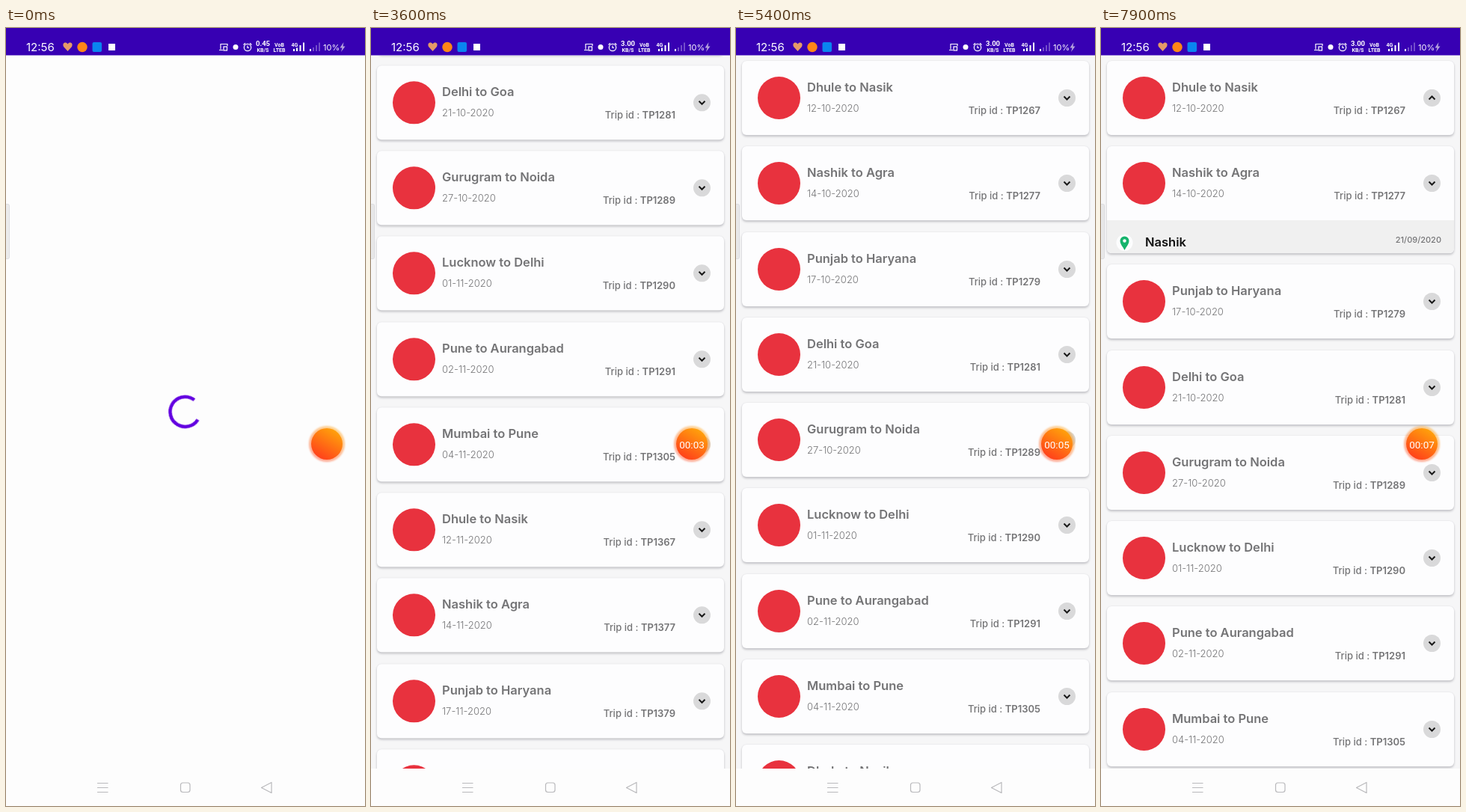
Recreate the animation shown at these times as an HTML page. Size 480 by 1040 pixels, loop 8000 ms.

```html
<!DOCTYPE html>
<html lang="en">
<head>
<meta charset="utf-8">
<title>Trip list</title>
<style>
  html, body { margin: 0; width: 100%; height: 100%; overflow: hidden; background: #fdfdfd; }
  #stage { position: absolute; left: 0; top: 0; width: 480px; height: 1040px; overflow: hidden;
    font-family: Inter, "Open Sans", sans-serif; color: #747476; }
  #stage svg { position: absolute; left: 0; top: 0; }
  .t { position: absolute; line-height: 20px; white-space: pre; }

  /* loader */
  #loader { animation: loader 8s step-end infinite; }
  #arc { transform-origin: 239.5px 513px; animation: spin 8s linear infinite; }
  @keyframes loader { 0% { visibility: visible } 6.25%, 100% { visibility: hidden } }
  @keyframes spin {
    0% { transform: rotate(31deg); stroke-dasharray: 277 360; stroke-dashoffset: 0; }
    6.25%, 100% { transform: rotate(140deg); stroke-dasharray: 25 360; stroke-dashoffset: -252; }
  }

  /* trip list */
  #view { position: absolute; left: 0; top: 37px; width: 480px; height: 953px; overflow: hidden;
    background: #f6f6f7; animation: show 8s step-end infinite; }
  #list { padding-top: 7px; animation: scroll 8s infinite; }
  @keyframes show { 0% { visibility: hidden } 6.25%, 100% { visibility: visible } }
  @keyframes scroll {
    0%, 41.25% { transform: none; animation-timing-function: cubic-bezier(.3, .1, .3, 1); }
    53.5%, 56.25% { transform: translateY(-744.5px); animation-timing-function: cubic-bezier(.3, .1, .3, 1); }
    66.25%, 100% { transform: none; }
  }
  .card { position: relative; margin: 0 8px 15.25px; border-radius: 6px; overflow: hidden;
    background: #fdfdfe; box-shadow: 0 0 2px #dcdce0, 0 2px 3px rgba(70, 70, 85, .32); }
  .head { position: relative; height: 99px; }
  .logo { position: absolute; left: 20.5px; top: 21px; width: 57px; height: 57px; border-radius: 50%; background: #e8323e; }
  .route { left: 87px; top: 25px; font-size: 16.5px; font-weight: 600; }
  .date { left: 87px; top: 53px; font-size: 13px; font-weight: 300; }
  .trip { right: 65px; top: 56px; font-size: 13px; font-weight: 500; }
  .trip b { font-weight: 600; }
  .more { position: absolute; left: 423px; top: 38px; width: 23px; height: 23px; border-radius: 50%; background: #d9d9da; }
  #stage .more svg { width: 23px; height: 23px; }
  .card:first-child .more { animation: flip 8s infinite; }
  @keyframes flip { 0%, 83% { transform: none } 86.5%, 100% { transform: rotate(180deg) } }

  /* expanding details */
  .panel { position: relative; height: 0; overflow: hidden; background: #f0f0f0; }
  .card:nth-child(1) .panel { animation: open1 8s infinite; }
  .card:nth-child(2) .panel { animation: open2 8s infinite; }
  @keyframes open1 {
    0%, 69.5% { height: 0; animation-timing-function: cubic-bezier(.4, 0, .2, 1); }
    74%, 83% { height: 258.5px; animation-timing-function: cubic-bezier(.4, 0, .2, 1); }
    87.75%, 100% { height: 0; }
  }
  @keyframes open2 {
    0%, 97.25% { height: 0; animation-timing-function: cubic-bezier(.333, 0, .667, .333); }
    100% { height: 145px; }
  }
  .stop { position: absolute; left: 0; width: 464px; height: 114px; }
  .city { left: 51px; top: 18.5px; font-size: 16.5px; font-weight: 600; color: #111; }
  .day { right: 17px; top: 15.5px; font-size: 11px; font-weight: 500; }
  .pick { left: 52px; top: 63px; font-size: 13px; font-weight: 600; color: #111; }
  .addr { left: 123px; top: 63px; font-size: 11.5px; font-weight: 300; color: #858587; }
  .map { right: 17px; top: 63px; font-size: 8.5px; font-weight: 500; color: #6200d8; }

  /* counters */
  #clock { position: absolute; left: 404px; top: 547px; width: 50px; height: 20px; overflow: hidden;
    text-align: center; color: #fff; font: 13.5px/20px Roboto, sans-serif; animation: clock 8s step-end infinite; }
  #clock div { animation: tick 8s steps(8) -7.9s infinite; }
  @keyframes clock { 0% { visibility: hidden } 1.25%, 100% { visibility: visible } }
  @keyframes tick { to { transform: translateY(-160px) } }
  #speed { position: absolute; left: 328px; top: 16px; width: 31px; height: 10px; overflow: hidden;
    text-align: center; color: #fff; font: 700 9.5px/10px Roboto, sans-serif; }
  #speed div { animation: speed 8s step-end infinite; }
  @keyframes speed {
    0% { transform: none }
    22.5% { transform: translateY(-10px) }
    41.25%, 100% { transform: translateY(-20px) }
  }
</style>
</head>
<body>
<div id="stage">
  <svg id="loader" width="480" height="1040">
    <rect width="480" height="1040" fill="#fdfdfd"/>
    <circle id="arc" cx="239.5" cy="513" r="20" pathLength="360" fill="none" stroke="#6200e0" stroke-width="4.5"/>
  </svg>

  <div id="view"><div id="list"></div></div>

  <svg width="480" height="1040">
    <defs>
      <linearGradient id="fire" x1=".2" y1="1" x2=".8" y2="0">
        <stop offset="0" stop-color="#ff3a1c"/><stop offset="1" stop-color="#ffa80a"/>
      </linearGradient>
      <filter id="soft" x="-20%" y="-20%" width="140%" height="140%"><feGaussianBlur stdDeviation="1"/></filter>
    </defs>
    <rect x="-4" y="235.5" width="8.5" height="73" rx="2" fill="#dcdcdf" fill-opacity=".55" stroke="#cfcfd4" stroke-opacity=".6"/>
    <circle cx="429" cy="556" r="24" fill="url(#fire)" opacity=".45" filter="url(#soft)"/>
    <circle cx="429" cy="556" r="21" fill="url(#fire)"/>

    <!-- status bar -->
    <rect width="480" height="36.5" fill="#3700b3"/>
    <g fill="#fff" font-family="Inter, sans-serif">
      <text x="27" y="31" font-size="15">12:56</text>
      <path d="M82.5 31 L77 25 C74.5 20 80 17.5 82.5 21.5 C85 17.5 90.5 20 88 25 Z" fill="#e59a68"/>
      <circle cx="102" cy="25.5" r="6.7" fill="#ff8618"/>
      <rect x="115.5" y="19" width="12.5" height="13" rx="2" fill="#0a84f0"/>
      <rect x="137" y="21" width="9" height="9"/>
      <g fill="none" stroke="#fff" stroke-width="1.2">
        <path d="M287 28.5 V21.5 H296 V24 M285 29.5 H290"/>
        <rect x="291" y="25" width="4.5" height="5"/>
        <circle cx="323" cy="26" r="4.7"/>
        <path d="M323 23.5 V26.5 H325 M317.5 22.5 L320 20.2 M328.5 22.5 L326 20.2"/>
      </g>
      <circle cx="307" cy="25.5" r="3.5"/>
      <g font-weight="700" font-size="7" font-family="Roboto, sans-serif">
        <text x="343.5" y="32" text-anchor="middle">KB/S</text>
        <text x="365.5" y="24.5" text-anchor="middle">VoB</text>
        <text x="365.5" y="31.5" text-anchor="middle">LTEB</text>
        <text x="381.5" y="25">4G</text>
      </g>
      <path d="M384 28h2v3h-2z M388 26.5h2v4.5h-2z M392.5 23h2v8h-2z M397 19.5h2v11.5h-2z"/>
      <path d="M406 28h2v3h-2z"/>
      <path d="M410 26h2v5h-2z M414 23h2v8h-2z M418 19.5h2v11.5h-2z" opacity=".3"/>
      <text x="424" y="29.5" font-size="11">10%</text>
      <path d="M451.5 19 L446.5 26.5 H449.5 L448 32 L453.5 24.5 H450.5 Z" fill="#b6a3dc"/>
    </g>

    <!-- navigation bar -->
    <rect y="990" width="480" height="50" fill="#fdfdfd"/>
    <g fill="none" stroke="#b9b9bc" stroke-width="1.2">
      <path d="M122 1009.5H136.5 M122 1015.5H136.5 M122 1021.5H136.5"/>
      <rect x="233.5" y="1009" width="12.5" height="12.5" rx="3"/>
      <path d="M341.5 1015.5 L355 1008.5 V1022.5 Z" stroke-linejoin="round"/>
    </g>
  </svg>

  <div id="speed"><div>0.45<br>0.58<br>3.00</div></div>
  <div id="clock"><div></div></div>
</div>

<script>
  const routes = [
    ['Dhule', 'Nasik', '12', 1267], ['Nashik', 'Agra', '14', 1277],
    ['Punjab', 'Haryana', '17', 1279], ['Delhi', 'Goa', '21', 1281],
    ['Gurugram', 'Noida', '27', 1289], ['Lucknow', 'Delhi', '01', 1290],
    ['Pune', 'Aurangabad', '02', 1291], ['Mumbai', 'Pune', '04', 1305]
  ];
  const address = 'K-518 lantern garden Velpu 208016';
  const text = (name, s) => `<div class="t ${name}">${s}</div>`;

  const stop = (top, city, day, color) => `
    <div class="stop" style="top:${top}px">
      <svg width="464" height="114">
        <circle cx="23.5" cy="30" r="11" fill="#fdfdfe"/>
        <path d="M23.5 40 C21 35 17.5 32 17.5 27.5 A6 6 0 0 1 29.5 27.5 C29.5 32 26 35 23.5 40 Z" fill="${color}"/>
        <circle cx="23.5" cy="27.5" r="2.2" fill="#fdfdfe"/>
        <path d="M46 50.5 H447" stroke="#7c7c7e"/>
        <circle cx="24.5" cy="73.5" r="7" fill="none" stroke="#747476" stroke-width="2.2"/>
        <g fill="none" stroke="#333" stroke-width="1.1">
          <circle cx="397.5" cy="73.5" r="5.5"/>
          <path d="M397.5 65.5v3 M397.5 78.5v3 M389.5 73.5h3 M402.5 73.5h3"/>
        </g>
        <circle cx="397.5" cy="73.5" r="2.7" fill="#222"/>
      </svg>
      ${text('city', city) + text('day', day) + text('pick', 'Pickup 1 :') + text('addr', address) + text('map', 'SEE MAP')}
    </div>`;

  const panel = (from, to) => `<div class="panel">
    ${stop(0, from, '21/09/2020', '#16b46c') + stop(114.5, to, '22/09/2020', '#f42034')}</div>`;

  const card = i => {
    const [from, to, day, id] = routes[i % 8];
    const round = Math.floor(i / 8);
    const month = 10 + round + (i % 8 > 4 ? 1 : 0);
    return `<div class="card"><div class="head">
      <div class="logo"></div>
      ${text('route', `${from} to ${to}`) + text('date', `${day}-${month}-2020`)}
      ${text('trip', `Trip id : <b>TP${id + 100 * round}</b>`)}
      <div class="more"><svg><path d="M7.5 9.5 L11.5 13.5 L15.5 9.5" fill="none" stroke="#1a1a1a" stroke-width="2"/></svg></div>
    </div>${i < 2 ? panel(from, i ? to : 'Nashik') : ''}</div>`;
  };

  document.querySelector('#list').innerHTML = Array.from({ length: 16 }, (_, i) => card(i)).join('');
  document.querySelector('#clock div').innerHTML = Array.from({ length: 8 }, (_, s) => `00:0${s}`).join('<br>');
</script>
</body>
</html>
```
